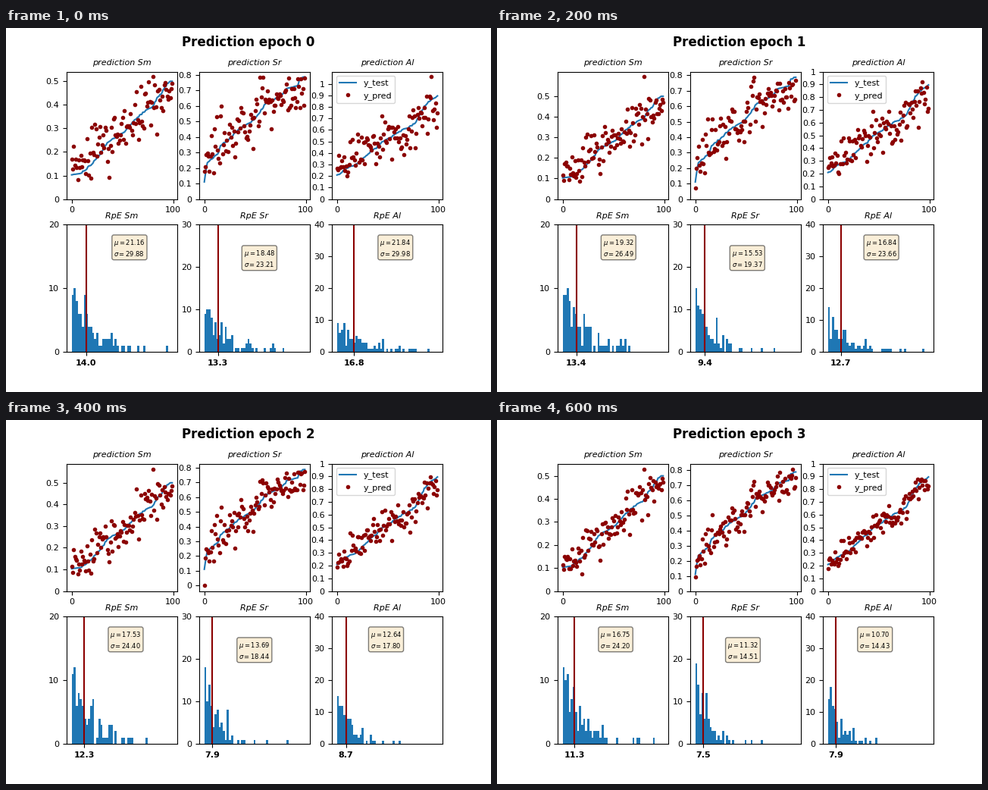
Write a matplotlib script that moves like this. It is 640 by 480 pixels and loops after 800 ms.

```python
import numpy as np
import matplotlib.pyplot as plt
from matplotlib.animation import FuncAnimation

EPOCHS = 4
SAMPLES = 100
INDEX = np.arange(SAMPLES)

plt.rcParams.update({"font.family": "DejaVu Sans", "font.size": 8})


class Panel:
    """One element: its sorted truth, improving predictions and error histogram."""

    def __init__(self, name, seed, curve, spread, pull, low, peak, starts, peaks,
                 top_tick, bar_top, medians, means, sigmas):
        self.name, self.spread, self.pull, self.low = name, spread, pull, low
        self.peak, self.starts, self.peaks = peak, starts, peaks
        self.ticks = np.arange(0, top_tick + 0.05, 0.1)
        self.bar_top = bar_top
        self.medians, self.means, self.sigmas = medians, means, sigmas

        rng = np.random.default_rng(seed)
        uneven = np.sort(INDEX + rng.normal(0, 0.8, SAMPLES))
        self.truth = np.interp(uneven, list(curve), list(curve.values()))
        self.noise = np.clip(rng.normal(0, 1, SAMPLES), -2.2, 2.2)
        self.jitter = rng.normal(0, 0.3, (EPOCHS, SAMPLES))
        # Evenly spread exponential quantiles, shaken a little
        quantiles = -np.log((INDEX + 0.5) / SAMPLES)
        self.shape = quantiles * rng.normal(1, 0.15, (EPOCHS, SAMPLES))

    def predict(self, epoch):
        progress = epoch / (EPOCHS - 1)
        spread = np.interp(progress, [0, 1], self.spread)
        pull = self.pull * (1 - progress)
        guess = self.truth + pull * (self.truth.mean() - self.truth)
        guess += spread * (self.noise + self.jitter[epoch])
        # Fold strays back into the plausible range
        guess = self.low + abs(guess - self.low)
        high = self.truth.max()
        guess = high - abs(high - guess)
        guess[0], guess[self.peak] = self.starts[epoch], self.peaks[epoch]
        return guess

    def draw_prediction(self, ax, epoch):
        ax.plot(INDEX, self.truth, label="y_test")
        ax.plot(INDEX, self.predict(epoch), ".", color="darkred", label="y_pred")
        ax.set_title(f"prediction {self.name}", fontsize=8, style="italic")
        ax.set_xticks([0, 100])
        ax.set_yticks(self.ticks, [f"{t:g}" for t in self.ticks])

    def draw_errors(self, ax, epoch):
        median, mean, sigma = self.medians[epoch], self.means[epoch], self.sigmas[epoch]
        errors = self.shape[epoch] * median / np.log(2)
        ax.hist(errors, bins=np.arange(0, 100, 2))
        ax.axvline(median, color="darkred")
        ax.text(mean + 20, 20 if self.bar_top == 30 else 0.75 * self.bar_top,
                f"$\\mu={mean:.2f}$\n$\\sigma={sigma:.2f}$", fontsize=6,
                bbox=dict(boxstyle="round", facecolor="wheat", alpha=0.5))
        ax.set_title(f"RpE {self.name}", fontsize=8, style="italic")
        ax.set_ylim(0, self.bar_top)
        ax.set_yticks(range(0, self.bar_top + 1, 10))
        ax.set_xticks([median], [f"{median:.1f}"], weight="bold")


PANELS = [
    Panel("Sm", 4,
          curve={0: .103, 10: .11, 20: .15, 27: .188, 37: .246, 51: .282, 67: .356,
                 81: .40, 90: .468, 97: .5},
          spread=(.065, .045), pull=.1, low=.07, peak=80,
          starts=(.17, .115, .115, .113), peaks=(.519, .594, .564, .53),
          top_tick=.5, bar_top=20, medians=(14.0, 13.4, 12.3, 11.3),
          means=(21.16, 19.32, 17.53, 16.75), sigmas=(29.88, 26.49, 24.40, 24.20)),
    Panel("Sr", 11,
          curve={0: .11, 2: .15, 3: .236, 13: .289, 17: .35, 34: .448, 51: .521,
                 60: .614, 77: .668, 81: .712, 92: .73, 96: .785, 99: .787},
          spread=(.09, .06), pull=.15, low=.16, peak=96,
          starts=(.18, .07, .002, .093), peaks=(.68, .74, .76, .806),
          top_tick=.8, bar_top=30, medians=(13.3, 9.4, 7.9, 7.5),
          means=(18.48, 15.53, 13.69, 11.32), sigmas=(23.21, 19.37, 18.44, 14.51)),
    Panel("Al", 23,
          curve={0: .206, 12: .28, 18: .295, 32: .40, 47: .51, 62: .587, 77: .66,
                 82: .748, 92: .861, 99: .896},
          spread=(.095, .055), pull=.25, low=.19, peak=93,
          starts=(.27, .25, .19, .176), peaks=(1.063, .92, .85, .83),
          top_tick=1, bar_top=40, medians=(16.8, 12.7, 8.7, 7.9),
          means=(21.84, 16.84, 12.64, 10.70), sigmas=(29.98, 23.66, 17.80, 14.43)),
]

fig, axes = plt.subplots(2, 3, figsize=(6.4, 4.8), dpi=100)
heading = fig.suptitle("", fontsize=12, weight="bold")


def draw(epoch):
    heading.set_text(f"Prediction epoch {epoch}")
    for panel, upper, lower in zip(PANELS, *axes):
        upper.clear()
        lower.clear()
        panel.draw_prediction(upper, epoch)
        panel.draw_errors(lower, epoch)
    axes[0, 2].legend(loc="upper left", fontsize=8)


anim = FuncAnimation(fig, draw, frames=EPOCHS, interval=200, repeat=True)
plt.show()
```
